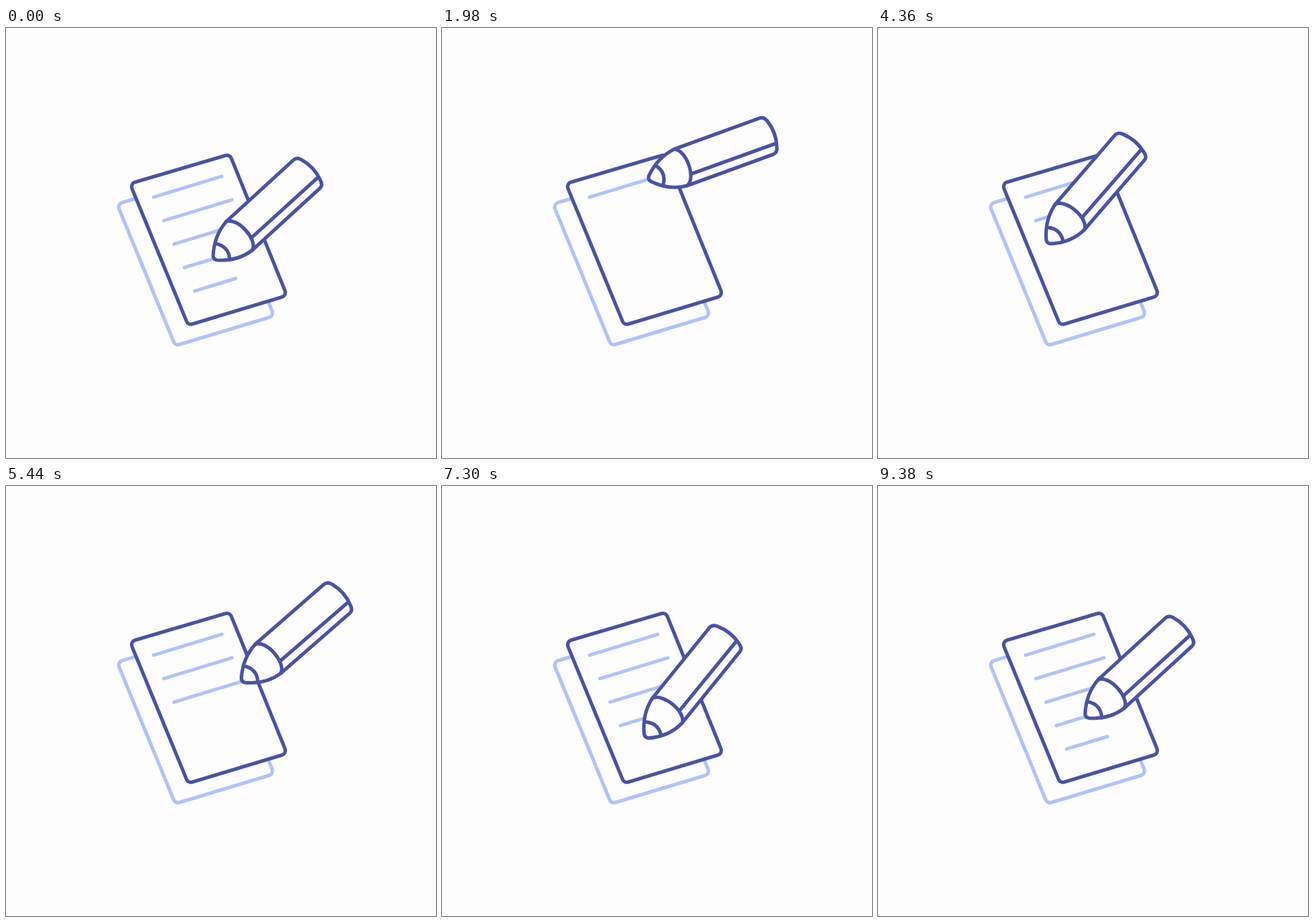
Recreate the animation shown at these times as an HTML page with a canvas. Size 600 px wide and 600 px high, loop 9.4 s.

```html
<!DOCTYPE html>
<html>
<head>
<meta charset="utf-8">
<style>
html, body { margin: 0; height: 100%; overflow: hidden; background: #fdfdfd; }
canvas { display: block; }
</style>
</head>
<body>
<canvas id="stage" width="600" height="600"></canvas>
<script>
const ctx = document.getElementById('stage').getContext('2d');
const PAPER = '#fdfdfd', DARK = '#4a53a2', LIGHT = '#b1c2fa';
const LOOP = 9400, LAST = 201, ERASED = 22;
const REST = [289.5, 323];

// When each text line is written, in steps
const starts = [28, 62, 95, 130, 161];
const ends = [48, 82, 115, 149, 186];
const lines = starts.map((start, i) => {
  const x = 206 + 14.3 * i, y = 236 + 32.75 * i, w = i < 4 ? 95 : 57;
  return { start, end: ends[i], from: [x, y], to: [x + w, y - w * 0.305] };
});

const tipKeys = [[0, REST]];
for (const l of lines) tipKeys.push([l.start, l.from], [l.end, l.to]);
tipKeys.push([LAST, REST]);

const tiltKeys = [[0, 42.5], [28, 24], [43, 20], [48, 24], [64, 46.5], [82, 28], [94, 49.2], [115, 41],
  [135, 52.4], [149, 45], [157, 51], [163, 51], [186, 45], [LAST, 42.5]].map(([n, a]) => [n, [a]]);

const sheet = [[173, 217.2], [312.1, 176.2], [392, 373.3], [254.2, 414.8]];

// Pencil with its tip at the origin, pointing left
const body = new Path2D('M3 -4Q23 -24 49 -27L176 -27Q182 -27 184.5 -20Q191 0 185 18Q183 27 177 27L49 27Q23 25 3 4Q0 0 3 -4Z');
const details = new Path2D('M49 -27C64.6 -21 64.6 21 49 27M17 -14.5Q28 0 17.5 14.5M59.5 13.5L185 14');

const ease = p => (1 - Math.cos(Math.PI * Math.min(1, Math.max(0, p)))) / 2;
const mix = (a, b, p) => a.map((v, i) => v + (b[i] - v) * p);

function sample(keys, n) {
  const i = Math.max(1, keys.findIndex(k => k[0] >= n));
  const [n0, a] = keys[i - 1], [n1, b] = keys[i];
  return mix(a, b, ease((n - n0) / (n1 - n0)));
}

// Steps last 20, 100 and 20 ms in turn
function stepAt(t) {
  const r = t % 140;
  return Math.min(LAST, 3 * Math.floor(t / 140) + (r < 20 ? 0 : r < 120 ? 1 : 2));
}

function drawSheet(dx, dy, color) {
  const pts = sheet.map(([x, y]) => [x + dx, y + dy]);
  ctx.beginPath();
  ctx.moveTo(...mix(pts[3], pts[0], 0.5));
  pts.forEach((p, i) => ctx.arcTo(...p, ...pts[(i + 1) % 4], 6.5));
  ctx.closePath();
  ctx.strokeStyle = color;
  ctx.fill();
  ctx.stroke();
}

function drawLine(l, n) {
  const p = n < ERASED ? 1 - ease(n / ERASED) : ease((n - l.start) / (l.end - l.start));
  if (p <= 0) return;
  ctx.beginPath();
  ctx.moveTo(...l.from);
  ctx.lineTo(...mix(l.from, l.to, p));
  ctx.stroke();
}

function drawPencil(n) {
  ctx.save();
  ctx.translate(...sample(tipKeys, n));
  ctx.rotate(-sample(tiltKeys, n)[0] * Math.PI / 180);
  ctx.strokeStyle = DARK;
  ctx.fill(body);
  ctx.stroke(body);
  ctx.stroke(details);
  ctx.restore();
}

function draw() {
  const n = stepAt(performance.now() % LOOP);
  ctx.fillStyle = PAPER;
  ctx.fillRect(0, 0, 600, 600);
  ctx.lineWidth = 4.9;
  ctx.lineCap = ctx.lineJoin = 'round';
  drawSheet(-18, 28.5, LIGHT);
  drawSheet(0, 0, DARK);
  ctx.strokeStyle = LIGHT;
  lines.forEach(l => drawLine(l, n));
  drawPencil(n);
  requestAnimationFrame(draw);
}
draw();
</script>
</body>
</html>
```
